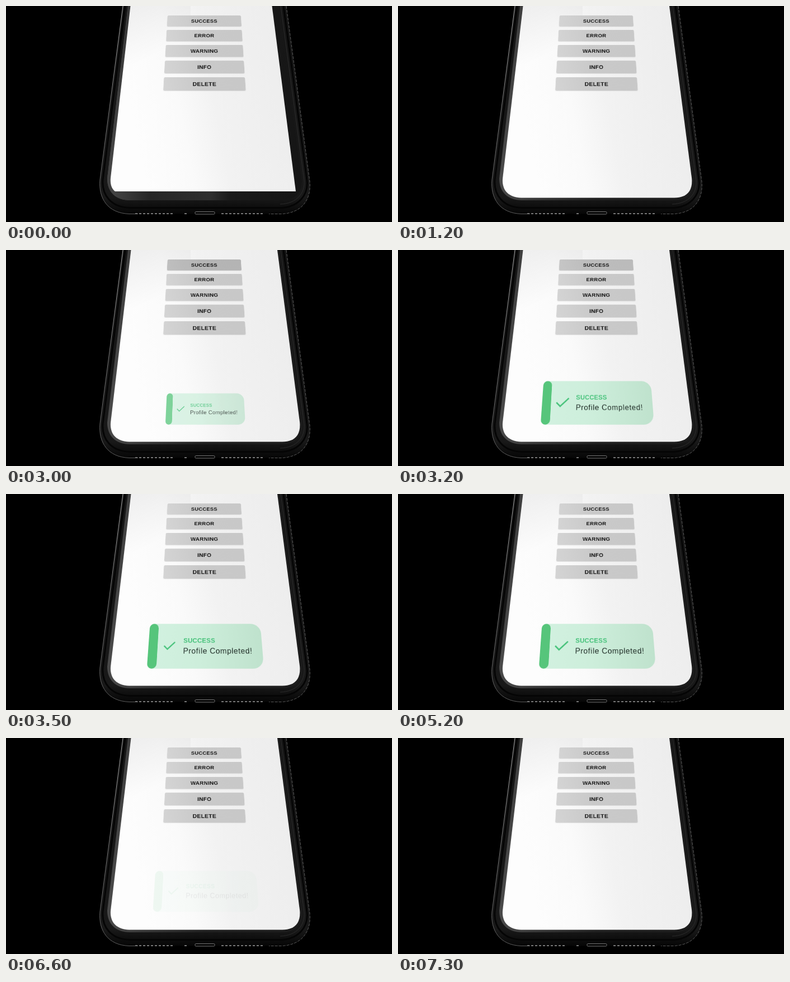
An HTML page that plays this animation: 690x388 px, repeating every 8 s.

```html
<!DOCTYPE html>
<html lang="en">
<head>
<meta charset="utf-8">
<title>Toast notification on a phone</title>
<style>
  html, body { margin: 0; width: 100%; height: 100%; overflow: hidden; background: #000; }
  #stage { position: relative; width: 690px; height: 388px; overflow: hidden;
    font-family: "Liberation Sans", Arial, Helvetica, sans-serif; }
  #stage > svg { position: absolute; inset: 0; }

  /* The app lies on a plane tilted away from the viewer; x = 0 is its centre line. */
  #plane { position: absolute; left: 0; top: 0; width: 0; height: 0; transform-origin: 0 0;
    transform: matrix3d(.65, 0, 0, 0, -.1761, .52846, 0, -.00050378, 0, 0, 1, 0, 354.2, 0, 0, 1); }

  .button { position: absolute; left: -99px; width: 198px; height: 35.5px; border-radius: 3px;
    background: linear-gradient(80deg, #d4d4d4, #c9c9c9 45%, #c8c8c8);
    box-shadow: 0 1px 2px rgba(0, 0, 0, .14);
    color: #151515; font: bold 14px/37px "Liberation Sans", Arial, sans-serif;
    letter-spacing: .4px; text-align: center; }

  #toast { position: absolute; left: -123px; top: 361px; width: 248px; height: 96px;
    border-radius: 10px 22px 22px 10px;
    background: linear-gradient(90deg, #d2f1e0, #cdeedb 45%, #bfe2cd); }
  #bar { position: absolute; left: 0; top: 0; width: 20px; height: 96px; border-radius: 10px;
    background: #56c57b; }
  #check { position: absolute; left: 31px; top: 33px; width: 30px; height: 30px; overflow: visible; }
  #toast span { position: absolute; left: 76px; white-space: nowrap; }
  #head { top: 28px; color: #46c27a; font: bold 14px/18px "Liberation Sans", Arial, sans-serif;
    letter-spacing: .3px; }
  #note { top: 49px; color: #1d2a24; font: 16.5px/20px "Liberation Sans", Arial, sans-serif;
    letter-spacing: .8px; }
</style>
</head>
<body>
<div id="stage">
  <svg width="690" height="388" viewBox="0 0 690 388" fill="none">
    <defs>
      <linearGradient id="glass" gradientUnits="userSpaceOnUse" x1="215" y1="150" x2="500" y2="95">
        <stop offset="0" stop-color="#fdfdfd"/>
        <stop offset=".3" stop-color="#fafafa"/>
        <stop offset=".52" stop-color="#f2f2f2"/>
        <stop offset="1" stop-color="#ededed"/>
      </linearGradient>
      <linearGradient id="shade" gradientUnits="userSpaceOnUse" x1="215" y1="10" x2="255" y2="95">
        <stop offset="0" stop-opacity=".05"/>
        <stop offset="1" stop-opacity="0"/>
      </linearGradient>
      <linearGradient id="body" x1="0" y1="0" x2="0" y2="1">
        <stop offset="0" stop-color="#151515"/>
        <stop offset=".92" stop-color="#191919"/>
        <stop offset="1" stop-color="#060606"/>
      </linearGradient>
      <linearGradient id="rim" gradientUnits="userSpaceOnUse" x1="180" y1="0" x2="530" y2="0">
        <stop offset="0" stop-color="#4b4b4b"/>
        <stop offset=".16" stop-color="#3a3a3a"/>
        <stop offset=".5" stop-color="#202020"/>
        <stop offset="1" stop-color="#1c1c1c"/>
      </linearGradient>
      <linearGradient id="shine" gradientUnits="userSpaceOnUse" x1="190" y1="0" x2="530" y2="0">
        <stop offset="0" stop-color="#444"/>
        <stop offset=".2" stop-color="#262626"/>
        <stop offset=".52" stop-color="#2f2f2f"/>
        <stop offset=".62" stop-color="#1b1b1b"/>
        <stop offset="1" stop-color="#151515"/>
      </linearGradient>
      <linearGradient id="edge" gradientUnits="userSpaceOnUse" x1="0" y1="0" x2="0" y2="375">
        <stop offset="0" stop-color="#aaa"/>
        <stop offset=".5" stop-color="#777"/>
        <stop offset="1" stop-color="#5c5c5c"/>
      </linearGradient>
    </defs>

    <path fill="url(#body)" d="M209 0 L168 312 C165 346 182 372 220 373.5 H492 C529 372 546 348 543 315 L501 0Z"/>
    <path stroke="url(#edge)" d="M209 0 L168 312 C165 346 182 372 220 373.5 H236"/>
    <path stroke="#5a5a5a" stroke-dasharray="5 2" d="M501 0 L543 315 C546 348 529 372 492 373.5 H470"/>
    <path stroke="#050505" stroke-width="3" d="M213 0 L173 312 C171 340 188 362 222 362.5 H490 C522 362 541 340 538 313 L496 0"/>
    <path stroke="#2c2c2c" d="M491 0 L533 313 C535 336 520 355 490 356"/>
    <path fill="url(#rim)" d="M218 0 L181 310 C181 334 196 349 222 349 H493 C517 349 530 335 529 312 L488 0Z"/>
    <g stroke="#777" stroke-width="2">
      <path stroke-dasharray="4 3" d="M231 373 H298 M385 373 H461"/>
      <path d="M319 373 H323"/>
      <rect x="338" y="369.5" width="35" height="4.5" rx="1.5" fill="#050505" stroke-width="1"/>
    </g>
    <path id="screen" fill="url(#glass)" d="M223.5 0 L187.2 309 C185 330 197 344 220 344.5 H494 C517 344.5 527 331 525.2 310 L485 0Z"/>

    <g id="cover">
      <path fill="url(#shine)" d="M218 0 L181 310 C181 334 196 349 222 349 H493 C517 349 530 335 529 312 L488 0Z"/>
      <path fill="url(#glass)" d="M222.5 0 L187 309 C186 320 189 329 195 333 H518 L475.5 0Z"/>
    </g>
    <path fill="url(#shade)" d="M223 0 L211 105 H330 V0Z"/>
  </svg>

  <div id="plane">
    <div id="toast">
      <div id="bar"></div>
      <svg id="check" viewBox="-15 -15 30 30" fill="none" stroke="#46c27a" stroke-width="2.6">
        <path d="M-11.5 .5 L-4.3 7.4 L11.5 -7.4"/>
      </svg>
      <span id="head">SUCCESS</span>
      <span id="note">Profile Completed!</span>
    </div>
  </div>
</div>

<script>
  const LOOP = 8000, STEP = 100;
  const $ = id => document.getElementById(id);
  const clamp = v => Math.min(1, Math.max(0, v));
  const part = (t, from, to) => clamp((t - from) / (to - from));

  const buttons = ["SUCCESS", "ERROR", "WARNING", "INFO", "DELETE"].map((label, i) => {
    const el = document.createElement("div");
    el.className = "button";
    el.textContent = label;
    el.style.top = 31.7 + 46 * i + "px";
    $("plane").prepend(el);
    return el;
  });

  // Linear interpolation in a table of [time, value] rows.
  function track(rows, t) {
    const i = rows.findIndex(row => row[0] > t);
    if (i < 0) return rows[rows.length - 1][1];
    if (i === 0) return rows[0][1];
    const [t0, v0] = rows[i - 1], [t1, v1] = rows[i];
    return v0 + (v1 - v0) * (t - t0) / (t1 - t0);
  }

  const coverFade = [[0, 1], [100, .5], [200, 0]];
  const successPress = [[2700, 1], [2900, .9], [3100, .9], [3400, 1]];
  const errorPress = [[6800, 1], [7000, .95], [7100, .95], [7300, 1]];

  // A quick beat once a second that settles before the next one.
  function beat(t) {
    const age = (t - 3110 + LOOP) % 1000;
    return age < 90 ? 1 + .2 * age / 90 : 1 + .2 * (1 - part(age, 90, 700)) ** 3;
  }

  function draw(t) {
    $("cover").style.opacity = track(coverFade, t);
    buttons[0].style.filter = `brightness(${track(successPress, t)})`;
    buttons[1].style.filter = `brightness(${track(errorPress, t)})`;

    const enter = 1 - (1 - part(t, 2850, 3450)) ** 4;
    const leave = part(t, 6150, 6640);
    const toast = $("toast").style;
    toast.visibility = enter > 0 && leave < 1 ? "visible" : "hidden";
    toast.opacity = Math.min(1, enter * 1.1) * (1 - leave);
    toast.transformOrigin = leave > 0 ? "55% 80%" : "50% 100%";
    toast.transform = `scale(${enter * (1 - .1 * leave)})`;
    $("check").style.transform = `scale(${leave > 0 ? 1 : beat(t)})`;
  }

  const start = performance.now();
  function tick() {
    const t = (performance.now() - start) % LOOP;
    draw(Math.floor(t / STEP) * STEP);
    requestAnimationFrame(tick);
  }
  tick();
</script>
</body>
</html>
```
